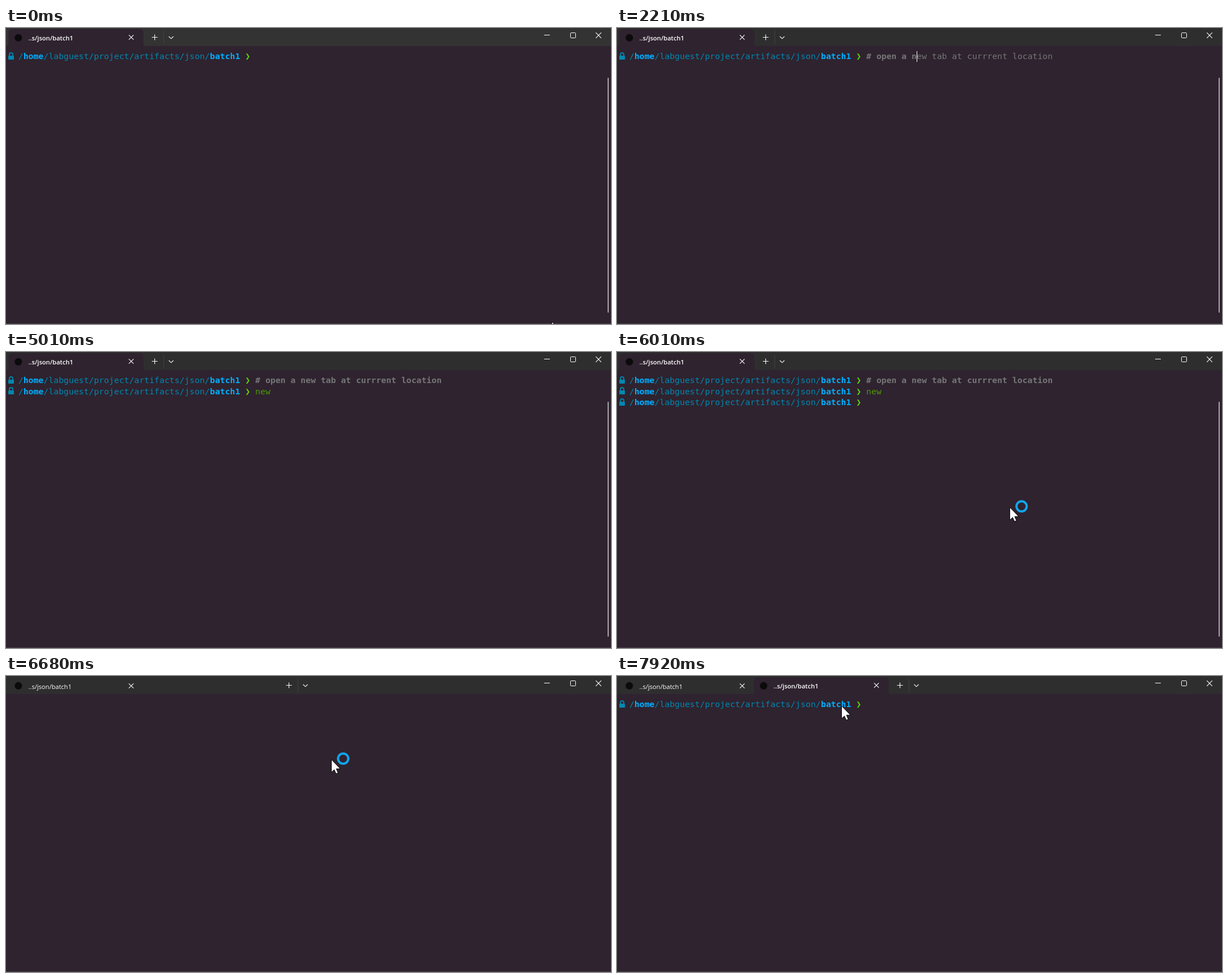
An HTML page with a canvas that plays this animation: 1068x524 px, repeating every 7990 ms.

```html
<!DOCTYPE html>
<html lang="en">
<head>
<meta charset="utf-8">
<title>Terminal: new tab</title>
<style>
  html, body { margin: 0; width: 100%; height: 100%; overflow: hidden; background: #2e232f; }
  canvas { display: block; }
</style>
</head>
<body>
<canvas id="stage" width="1068" height="524"></canvas>
<script>
const ctx = document.getElementById('stage').getContext('2d');
const LOOP = 7990;
const COL = 8.9, LEFT = 4, PROMPT_COLS = 49;
const BG = '#2e232f', BAR = '#2e2e2e', GREY = '#767676';
const COMMENT = '# open a new tab at currrent location';
const TITLE = '..s/json/batch1';
const TAB_STEP = 237;

const rowTop = row => [41, 60, 80][row];

function put(col, row, string, color, bold) {
  ctx.font = `${bold ? 'bold ' : ''}14.78px "DejaVu Sans Mono", monospace`;
  ctx.fillStyle = color;
  ctx.fillText(string, LEFT + col * COL, [55, 75, 94][row]);
}

function stroke(color, width, trace) {
  ctx.strokeStyle = color;
  ctx.lineWidth = width;
  ctx.beginPath();
  trace();
  ctx.stroke();
}

function polyline(...points) {
  points.forEach(([x, y], i) => i ? ctx.lineTo(x, y) : ctx.moveTo(x, y));
}

function lock(row) {
  const y = rowTop(row) + 2;
  ctx.fillStyle = '#0087af';
  ctx.beginPath();
  ctx.roundRect(4, y + 6, 10, 7, 1);
  ctx.fill();
  stroke('#0087af', 1.8, () => {
    ctx.moveTo(6, y + 7);
    ctx.lineTo(6, y + 4);
    ctx.arc(9, y + 4, 3, Math.PI, 0);
    ctx.lineTo(12, y + 7);
  });
}

function prompt(row) {
  lock(row);
  put(2, row, '/', '#0087af');
  put(3, row, 'home', '#00afff', true);
  put(7, row, '/labguest/project/artifacts/json/', '#0087af');
  put(40, row, 'batch1', '#00afff', true);
  put(47, row, '❯', '#5fd700');
}

function caret(col, row) {
  ctx.fillStyle = '#fff';
  ctx.fillRect(Math.floor(LEFT + col * COL), rowTop(row), 1, row ? 20 : 19);
}

function cross(x, y, r) {
  stroke('#fff', 1.1, () => {
    polyline([x - r, y - r], [x + r, y + r]);
    polyline([x + r, y - r], [x - r, y + r]);
  });
}

function tab(index, title, active) {
  const x = index * TAB_STEP;
  if (active) {
    const l = x + 4.5, r = x + 242.5;
    ctx.fillStyle = BG;
    ctx.beginPath();
    ctx.moveTo(l - 4, 32);
    ctx.quadraticCurveTo(l, 32, l, 28);
    ctx.lineTo(l, 9);
    ctx.quadraticCurveTo(l, 2, l + 7, 2);
    ctx.lineTo(r - 7, 2);
    ctx.quadraticCurveTo(r, 2, r, 9);
    ctx.lineTo(r, 28);
    ctx.quadraticCurveTo(r, 32, r + 4, 32);
    ctx.fill();
  }
  ctx.fillStyle = '#0b0b0b';
  ctx.beginPath();
  ctx.arc(x + 21.8, 17.3, 6.5, 0, 7);
  ctx.fill();
  ctx.font = `${active ? 600 : 500} 11.1px "Open Sans", sans-serif`;
  ctx.fillStyle = '#fff';
  ctx.fillText(title, x + 39.5, active ? 21.5 : 22.5);
  cross(x + 221, active ? 16.5 : 17.5, 4.2);
}

function titleBar(barColor, tabs, title, active) {
  ctx.fillStyle = barColor;
  ctx.fillRect(0, 0, 1068, 32);
  tab(0, title, active === 0);
  if (active === 1) tab(1, TITLE, true);

  const x = (tabs - 1) * TAB_STEP;
  stroke('#fff', 1.1, () => {
    polyline([x + 257.5, 16.5], [x + 267.5, 16.5]);
    polyline([x + 262.5, 11.5], [x + 262.5, 21.5]);
    polyline([x + 287.5, 15], [x + 291.5, 18.8], [x + 295.5, 15]);
  });
  ctx.fillStyle = '#414141';
  ctx.fillRect(x + 278, 5, 1, 24);

  stroke('#fff', 1, () => {
    polyline([950, 12.5], [960, 12.5]);
    ctx.roundRect(996.5, 8.5, 9, 9, 1);
  });
  cross(1046, 13, 4.8);
}

function pointer(x, y, busy) {
  ctx.save();
  ctx.translate(x, y);
  ctx.beginPath();
  polyline([0.5, 0], [0.5, 22.5], [5.4, 17.8], [8.7, 25], [12.2, 23.5], [9, 16.3], [16, 16]);
  ctx.closePath();
  ctx.fillStyle = '#fff';
  ctx.fill();
  ctx.strokeStyle = '#000';
  ctx.lineWidth = 0.9;
  ctx.stroke();
  if (busy) stroke('#11a5ee', 4, () => ctx.arc(21.2, -1.7, 9, 0, 7));
  ctx.restore();
}

// Time, x, y: straight eased moves between the stops.
const ARRIVE = [[70, 963, 520], [410, 693, 275]];
const LEAVE = [[6010, 693, 275], [6680, 574, 148], [6810, 572, 147], [7570, 371, 33], [7920, 396, 53]];

function along(stops, t) {
  if (t <= stops[0][0]) return stops[0].slice(1);
  for (let i = 1; i < stops.length; i++) {
    const [t0, x0, y0] = stops[i - 1], [t1, x1, y1] = stops[i];
    if (t < t1) {
      const p = (t - t0) / (t1 - t0), k = p * p * (3 - 2 * p);
      return [x0 + (x1 - x0) * k, y0 + (y1 - y0) * k];
    }
  }
  return stops[stops.length - 1].slice(1);
}

function typedCount(t) {
  if (t >= 3080) return COMMENT.length;
  if (t >= 2210) return Math.min(16, 10 + Math.floor((t - 2210) / 80));
  if (t >= 1800) return 9;
  return t < 1020 ? 0 : Math.min(8, 1 + Math.floor((t - 1020) / 91.4));
}

function firstTab(t) {
  prompt(0);
  const typed = typedCount(t);
  if (typed) {
    put(PROMPT_COLS, 0, COMMENT.slice(0, typed), GREY, true);
    put(PROMPT_COLS + typed, 0, COMMENT.slice(typed), GREY);
  }
  if (t < 3410) {
    if (t >= 340) caret(PROMPT_COLS + typed, 0);
  } else {
    prompt(1);
    const letters = t < 4280 ? 0 : t < 4340 ? 1 : t < 4410 ? 2 : 3;
    const known = letters === 3;
    put(PROMPT_COLS, 1, 'new'.slice(0, letters), known ? '#4e9a06' : '#cc0000', !known);
    if (letters) put(PROMPT_COLS + letters, 1, 'new'.slice(letters), GREY);
    if (t < 4020 || (t >= 4280 && t < 5010)) caret(PROMPT_COLS + letters, 1);
    if (t >= 5130 && t < 5470) caret(0, 2);
    if (t >= 5470) prompt(2);
    if (t >= 5470 && t < 5740) caret(PROMPT_COLS, 2);
  }
  ctx.fillStyle = '#aaa3aa';
  ctx.beginPath();
  ctx.roundRect(1062, 88, 2, 416, 1);
  ctx.fill();
}

function draw(t) {
  ctx.fillStyle = BG;
  ctx.fillRect(0, 0, 1068, 524);
  ctx.fillStyle = '#474046';
  ctx.fillRect(0, 523, 1068, 1);

  const opened = t >= 6550, shown = t >= 6810;
  const running = t >= 5130 && t < 5470;
  titleBar(t < 70 ? '#333333' : BAR, opened ? 2 : 1, running ? 'new' : TITLE, shown ? 1 : opened ? -1 : 0);

  if (!opened) firstTab(t);
  else if (t >= 7200) {
    prompt(0);
    if (t < 7730) caret(PROMPT_COLS, 0);
  }

  if (t < 960) pointer(...along(ARRIVE, t));
  if (t >= 6010) pointer(...along(LEAVE, t), t < 7000);
}

function frame() {
  draw(performance.now() % LOOP);
  requestAnimationFrame(frame);
}
frame();
</script>
</body>
</html>
```
